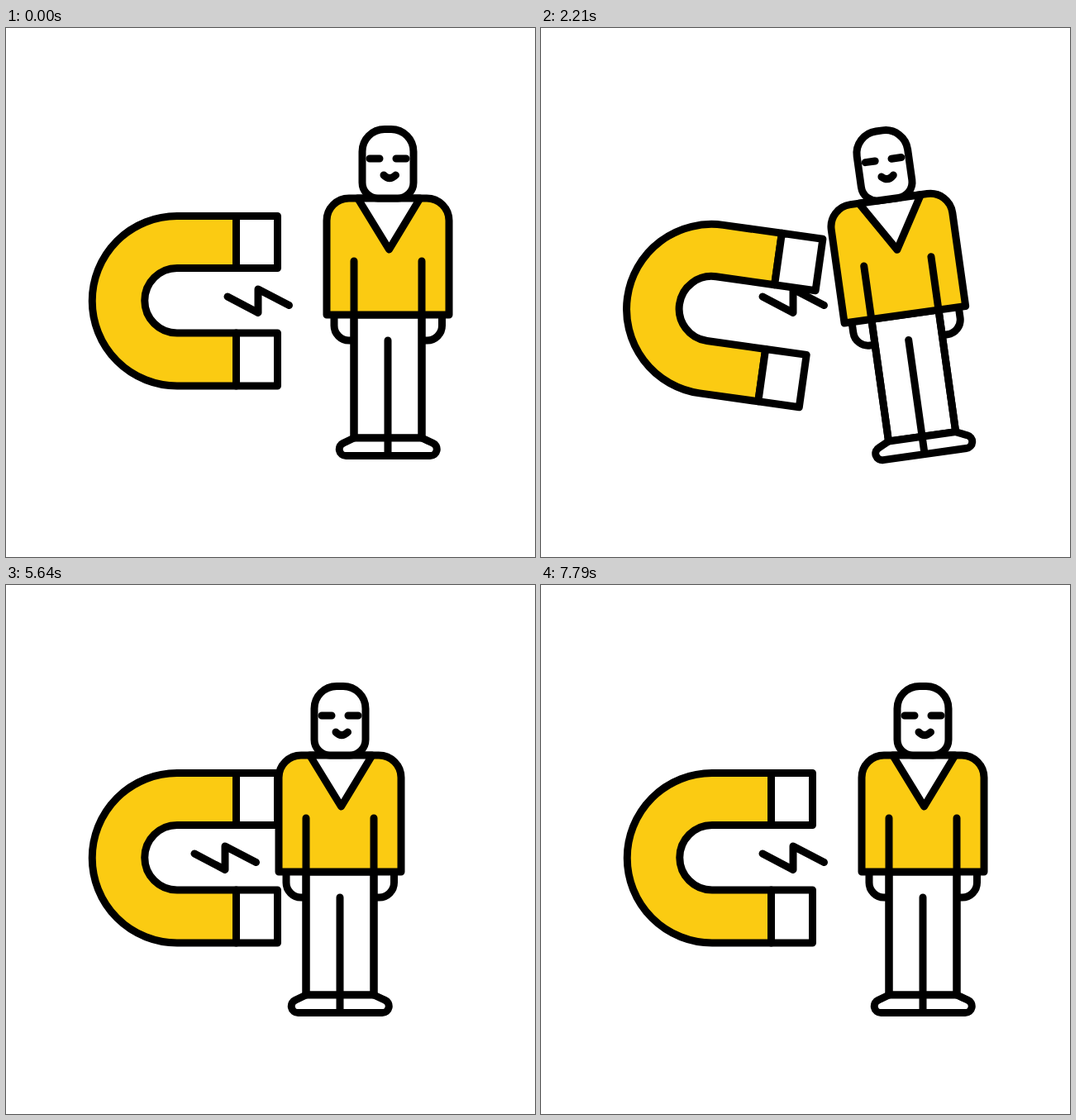
Write an HTML page that moves like this. It is 640x640 px and loops after 9640 ms.

```html
<!DOCTYPE html>
<html lang="en">
<head>
<meta charset="utf-8">
<title>Magnet</title>
<style>
  html, body { margin: 0; height: 100%; overflow: hidden; background: #fff; }
  svg { display: block; width: 100%; height: 100%; }
  svg * { stroke: #000; stroke-width: 9; stroke-linecap: round; stroke-linejoin: round; }
  .gold { fill: #fbcb12; }
  .white { fill: #fff; }
  .line { fill: none; }
</style>
</head>
<body>
<svg viewBox="0 0 640 640">
  <g id="magnet">
    <path class="gold" d="M278.5 227.5H207A102.75 102.75 0 0 0 207 433H278.5V369H207A39.25 39.25 0 0 1 207 290.5H278.5Z"/>
    <path class="white" d="M278.5 227.5H328.5V290.5H278.5ZM278.5 369H328.5V433H278.5Z"/>
  </g>
  <path id="bolt" class="line" d="M268 325L305 344.5V316L342.5 335.5"/>
  <g id="man">
    <path class="white" d="M397 347V360A18 18 0 0 0 415 378H421M527.5 347V360A18 18 0 0 1 509.5 378H503"/>
    <path class="white" d="M421 347H503V496H421Z"/>
    <path class="white" d="M421 496H503L516 502A8 8 0 0 1 513 517.5H411.5A8 8 0 0 1 408.500 502Z"/>
    <path class="gold" d="M388 347V233A27 27 0 0 1 415 206H509A27 27 0 0 1 536 233V347Z"/>
    <path class="white" d="M425.500 206L463.500 268L501 206Z"/>
    <path class="line" d="M421 282V496M503 282V496M462 378V517"/>
    <path class="white" d="M431 149.500A27 27 0 0 1 458 122.500H466A27 27 0 0 1 493 149.500V187A19 19 0 0 1 474 206H450A19 19 0 0 1 431 187Z"/>
    <path class="line" d="M440 158H452M472 158H484M457 178Q464 185 471.500 178"/>
  </g>
</svg>
<script>
const LOOP = 9640;

// Cubic bezier easing with end heights 0 and 1, solved by bisection
const bezier = (x1, x2) => t => {
  let lo = 0, hi = 1, s;
  for (let i = 0; i < 24; i++) {
    s = (lo + hi) / 2;
    const r = 1 - s;
    if (3 * r * r * s * x1 + 3 * r * s * s * x2 + s ** 3 < t) lo = s; else hi = s;
  }
  return s * s * (3 - 2 * s);
};

const smooth = t => t * t * (3 - 2 * t);
const quadIn = t => t * t;
const quadOut = t => 1 - (1 - t) ** 2;
const surge = bezier(.88, .7);
const settle = bezier(.3, .2);

// Each key: time, value, easing of the move that ends there
const tilt = [[0, 0], [410, 3, smooth], [1010, -3.4, smooth], [1620, 5, smooth],
  [2210, -8, smooth], [2480, 0, smooth]];
const magnetX = [[2360, 0], [3250, -50, quadOut], [3860, 24, surge], [4640, 0, settle],
  [5640, 0, smooth], [6680, -26.5, surge], [7790, 0, settle]];
const boltX = [[2240, 0], [3250, -90, quadOut], [3860, -16, surge], [4640, -40, settle],
  [5640, -40, smooth], [6680, -76, surge], [7790, 0, settle]];
const manX = [[1920, 0], [2360, -58, quadIn], [3250, -108, quadOut], [3860, -34, surge],
  [4640, -58, settle], [5640, -58, smooth], [6680, 25, surge], [7790, 0, settle]];

function at(keys, t) {
  if (t <= keys[0][0]) return keys[0][1];
  const i = keys.findIndex(k => k[0] > t);
  if (i < 0) return keys[keys.length - 1][1];
  const [t0, v0] = keys[i - 1], [t1, v1, ease] = keys[i];
  return v0 + (v1 - v0) * ease((t - t0) / (t1 - t0));
}

const place = (id, x, turn = 0, pivot = "0 0") =>
  document.getElementById(id).setAttribute("transform", `translate(${x} 0) rotate(${turn} ${pivot})`);

function draw(now) {
  const t = now % LOOP, angle = at(tilt, t);
  place("magnet", at(magnetX, t), -angle, "136 330");
  place("bolt", at(boltX, t));
  place("man", at(manX, t), angle, "462 320");
}

const start = performance.now();
function tick() {
  draw(performance.now() - start);
  requestAnimationFrame(tick);
}
tick();
</script>
</body>
</html>
```
